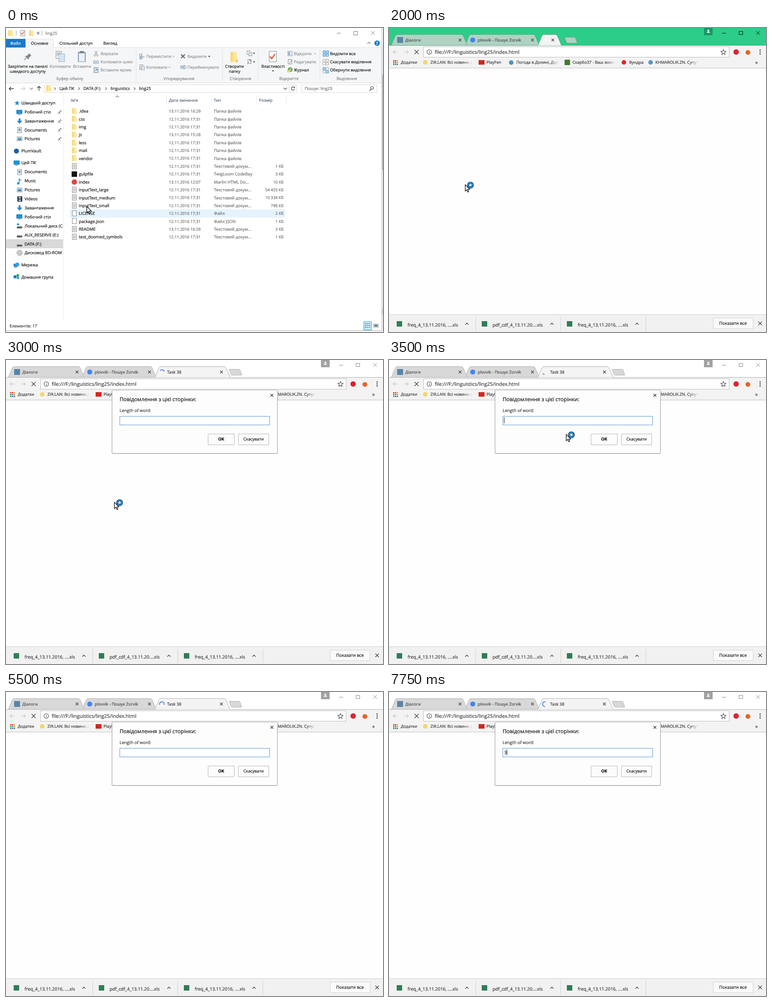
These frames come from a looping animation (833 by 672 pixels, 8 s). An HTML page:

```html
<!DOCTYPE html>
<html lang="uk">
<head>
<meta charset="utf-8">
<title>ling25</title>
<style>
html, body { margin: 0; width: 100%; height: 100%; overflow: hidden; background: #fff; }
svg { display: block; }
#stage { width: 100vw; height: 100vh; }
text { font-family: "Open Sans", "Noto Sans", sans-serif; text-rendering: geometricPrecision; white-space: pre; stroke-width: .2px; }
rect { shape-rendering: crispEdges; }
</style>
</head>
<body>
<svg id="stage" viewBox="0 0 833 672" preserveAspectRatio="none"></svg>
<script>
const INK = '#111', DIM = '#8a8a8a', GREY = '#6b6b6b', BLUE = '#1979ca';

// Drawing helpers; each returns SVG markup.
const R = (x, y, w, h, fill, line) => line
  ? `<rect x="${x + .5}" y="${y + .5}" width="${w - 1}" height="${h - 1}" fill="${fill}" stroke="${line}"/>`
  : `<rect x="${x}" y="${y}" width="${w}" height="${h}" fill="${fill}"/>`;
const P = (d, line, width = 1, fill = 'none') =>
  `<path d="${d}" stroke="${line}" stroke-width="${width}" fill="${fill}"/>`;
const C = (x, y, r, fill, line = 'none', width = 1) =>
  `<circle cx="${x}" cy="${y}" r="${r}" fill="${fill}" stroke="${line}" stroke-width="${width}"/>`;
// y is the middle of the capital letters
const T = (x, y, s, fill = INK, size = 9.25, anchor = 'start', weight = 400) =>
  `<text x="${x}" y="${y + size * .36}" fill="${fill}" stroke="${fill}" font-size="${size}" text-anchor="${anchor}" font-weight="${weight}">${s}</text>`;
const G = (id, body) => `<g id="${id}">${body}</g>`;
const clip = (x, y, w, h, body) =>
  `<svg x="${x}" y="${y}" width="${w}" height="${h}" viewBox="${x} ${y} ${w} ${h}">${body}</svg>`;

const vline = (x, y, h, c) => R(x, y, 1, h, c);
const hline = (x, y, w, c) => R(x, y, w, 1, c);
const cross = (x, y, r, c, w = 1) =>
  P(`M${x - r} ${y - r}L${x + r} ${y + r}M${x + r} ${y - r}L${x - r} ${y + r}`, c, w);
const drop = (x, y, c = '#333') => P(`M${x - 2.5} ${y - 1.2}h5l-2.5 2.7z`, 'none', 0, c);
const chev = (x, y, dx, dy, c = '#444', w = 1.2) => dx
  ? P(`M${x - 1.5 * dx} ${y - 3}l${3 * dx} 3l${-3 * dx} 3`, c, w)
  : P(`M${x - 3.5} ${y - 1.7 * dy}l3.5 ${3.4 * dy}l3.5 ${-3.4 * dy}`, c, w);
const arrow = (x, y, dx, c, w = 1.3) =>
  P(`M${x - 5} ${y}h10M${x + dx} ${y - 4}l${4 * dx} 4l${-4 * dx} 4`, c, w);
const folder = (x, y, w = 11, h = 13) =>
  R(x, y, w, h, '#fde596') + R(x, y, w * .3, h, '#f8d775') + R(x + w - 2, y, 2, h * .45, '#fff3c4');
const sheet = (x, y, lines = true, w = 10, h = 13) => R(x, y, w, h, '#fff', '#868686') +
  (lines ? [3, 5, 7, 9].map(k => hline(x + 2, y + k, w - 4, '#a0a0a0')).join('') : '');
const tick = (x, y, s) => P(`M${x - s} ${y}l${s * .7} ${s * .8}l${s * 1.2} ${-s * 1.7}`, '#d8542b', s * .42);
const disk = (x, y) => R(x - 6, y, 12, 4, '#5b5f62') + R(x - 5, y - 1, 10, 1, '#b6babd') + R(x + 3, y + 1, 2, 1, '#7ee06a');
const screen = (x, y) => R(x - 6, y - 5, 13, 9, '#1b95e0', '#1476b5') + R(x - 3, y + 5, 7, 1, '#5f6f7c');
const photo = (x, y) => R(x - 6, y - 5, 12, 10, '#fff', '#8795a0') + R(x - 4, y - 3, 8, 3, '#6fb4e2') + R(x - 4, y, 8, 3, '#47789a');
const down = (x, y) => P(`M${x - 2} ${y - 6}h4v5h4l-6 7l-6 -7h4z`, 'none', 0, '#2e86cf');
const doc = (x, y) => sheet(x - 5, y - 6) + R(x - 2, y - 3, 4, 5, '#5aa0d6');
const pin = (x, y) => P(`M${x - 4} ${y + 4}l3 -3M${x - 3} ${y - 1}l4 4M${x - 1} ${y}l3 -3M${x + 1} ${y - 4}l3 3`, '#868c92', 1.6);

function ribbon() {
  let s = R(0, 0, 833, 43, '#fff') + R(0, 43, 830, 78, '#f5f6f7') + hline(0, 43, 830, '#dcdddf') + hline(0, 121, 830, '#dadbdc');
  // title row
  s += folder(5, 5, 11, 13) + vline(22, 5, 12, '#999') + sheet(32, 5, false, 10, 13) + tick(37, 11, 3.6) +
    folder(51, 5, 10, 13) + hline(68, 9, 6, '#333') + drop(71, 13) + vline(79, 5, 12, '#aaa') + T(87, 11.5, 'ling25', '#777', 9.3);
  s += hline(731, 11, 9, '#777') + R(768, 7, 9, 9, 'none', '#777') + cross(810.5, 11, 4, '#777');
  // tabs
  s += R(0, 24, 43, 19, BLUE) + T(21, 34, 'Файл', '#fff', 9.1, 'middle') + R(43, 24, 62, 20, '#f5f6f7', '#dcdddf') + R(44, 43, 60, 1, '#f5f6f7') +
    T(55, 34, 'Основне', INK, 9.1) + T(118, 34, 'Спільний доступ', INK, 9.1) + T(215, 34, 'Вигляд', INK, 9.1) +
    chev(802, 33, 0, -1, '#777') + C(820, 33.5, 6, BLUE) + T(820, 33.5, '?', '#fff', 9, 'middle', 700);
  for (const x of [287, 478, 557, 693]) s += vline(x, 47, 70, '#e0e1e2');
  for (const [x, l] of [[141, 'Буфер обміну'], [382, 'Упорядкування'], [518, 'Створення'], [625, 'Відкриття'], [753, 'Виділення']])
    s += T(x, 112, l, '#7d7d7d', 9, 'middle');
  // large buttons
  for (const [x, y, l, c] of [[48, 85, 'Закріпити на панелі', INK], [48, 95.5, 'швидкого доступу', INK], [120, 85, 'Копіювати', DIM],
    [168, 85, 'Вставити', DIM], [505, 85, 'Створити', INK], [505, 95.5, 'папку', INK], [590, 85, 'Властивості', INK]])
    s += T(x, y, l, c, 9, 'middle');
  s += P('M40 71l6 -6', '#7e858c', 1.5) + P('M42 62l8 8l1 -5l5 -4l-5 -5l-4 5z', 'none', 0, '#7e858c') +
    sheet(110, 51, true, 13, 17) + R(116, 57, 14, 18, '#d5e3f0', '#9fb3c6') +
    R(159, 53, 17, 22, '#8ba3ba', '#7891a8') + R(161, 56, 13, 18, '#e9f0f6') + R(163, 51, 9, 4, '#74818d') +
    folder(496, 53, 15, 22) + P('M508 75l3 -5l1 5z', '#e2a53a', 1) + sheet(581, 51, false, 17, 24) + tick(589, 63, 6) + drop(590, 95);
  // small buttons
  for (const [x, y, l, c] of [[209, 57, 'Вирізати', DIM], [209, 75, 'Копіювати шлях', DIM], [209, 93, 'Вставити ярлик', DIM],
    [310, 63, 'Перемістити', DIM], [310, 87, 'Копіювати', DIM], [401, 63, 'Видалити', DIM], [401, 87, 'Перейменувати', DIM],
    [636, 57, 'Відкрити', DIM], [636, 75, 'Редагувати', DIM], [636, 93, 'Журнал', INK],
    [716, 57, 'Виділити все', INK], [716, 75, 'Скасувати виділення', INK], [716, 93, 'Обернути виділення', INK]])
    s += T(x, y, l, c, 9);
  s += P('M196 51l5 8M202 51l-5 8', '#8797a5', 1.2) + C(196, 60.5, 1.8, 'none', '#8797a5') + C(202, 60.5, 1.8, 'none', '#8797a5') +
    R(193, 72, 12, 7, '#dfe8f0', '#93a7ba') + hline(195, 75, 7, '#6d8aa5') + R(194, 87, 10, 12, '#dbe6f0', '#62809c') + P('M197 95l4 -4m-3 0h3v3', '#4e7398');
  s += sheet(295, 57, false, 6, 12) + arrow(301, 64, -1, '#a1b4c6', 2) + sheet(295, 81, true, 8, 11) + R(299, 84, 8, 9, '#d9e5f0', '#9fb3c6') +
    cross(391, 62.5, 4.2, '#5f6f80', 2.4) + R(385, 83, 13, 7, '#e6edf4', '#97a9ba') + R(387, 85, 5, 3, '#93b0cb') + vline(393, 81, 11, '#788898') +
    drop(370, 63, '#aaa') + drop(361, 87, '#aaa') + drop(449, 63);
  s += sheet(532, 50, false, 7, 9) + R(536, 54, 8, 8, '#e8f1f9', '#7e99b2') + drop(548, 56) + sheet(534, 69, false, 8, 10) + P('M533 79l8 -8m-4 0h4v4', '#4e7398') + drop(548, 75);
  s += R(622, 51, 11, 11, '#dfe8f0', '#8fa5ba') + R(624, 53, 3, 7, '#8fa5ba') + drop(683, 57, '#aaa') + sheet(623, 69, false, 9, 11) + P('M626 78l6 -7', '#8fa5ba', 1.6) +
    C(628, 92, 5.3, '#62a84f') + P('M628 89v4h3', '#fff', 1.2) + R(621, 93, 7, 5, '#f4d268');
  for (const [y, on] of [[50, [1, 1, 1, 1]], [69, [0, 0, 0, 0]], [87, [1, 0, 0, 1]]])
    on.forEach((v, i) => s += R(700 + i % 2 * 7, y + (i >> 1) * 7, 6, 6, v ? '#bfe0f6' : '#fff', v ? '#2b88cc' : '#a3a3a3'));
  return s;
}

function addressBar() {
  let s = arrow(12, 134, -1, '#333') + arrow(37, 134, 1, '#cfcfcf') + chev(56, 134, 0, 1, '#777') +
    P('M73 139v-10M69 133l4 -4l4 4', '#333', 1.3) + R(84, 125, 559, 18, '#fff', '#d9d9d9') + folder(89, 127, 11, 13) +
    vline(625, 125, 18, '#d9d9d9') + chev(617, 134, 0, 1) + P('M637.2 132a3.6 3.6 0 1 0 .4 2.6', '#444', 1.3) + drop(637, 131.5, '#444');
  for (const x of [108, 161, 221, 284]) s += chev(x, 134, .8, 0);
  for (const [x, l] of [[118, 'Цей ПК'], [171, 'DATA (F:)'], [231, 'linguistics'], [294, 'ling25']]) s += T(x, 133.5, l, INK, 9.35);
  return s + R(652, 125, 168, 18, '#fff', '#d9d9d9') + T(660, 134, 'Пошук: ling25', '#6c6c6c', 9.3) +
    C(809, 132.5, 3, 'none', '#444', 1.2) + P('M807 135l-4 4', '#444', 1.5);
}

function sidebar() {
  const items = [
    [166, 34, 'Швидкий доступ', P('M24.5 160l1.7 4h4.3l-3.4 2.8l1.3 4.5l-3.9 -2.7l-3.9 2.7l1.3 -4.5l-3.4 -2.8h4.3z', 'none', 0, '#2b8fd8')],
    [186, 41, 'Робочий стіл', screen(29, 186)], [205.5, 41, 'Завантаження', down(30, 206)],
    [225.5, 41, 'Documents', doc(30, 225)], [245, 41, 'Pictures', photo(30, 245)],
    [272, 34, 'PlumVault', C(23, 272, 5.5, '#1560a8')], [298, 34, 'Цей ПК', screen(23, 298)],
    [318, 41, 'Documents', doc(30, 318)],
    [338, 41, 'Music', P('M29 344v-11q1 3 5 4', '#2b8fd8', 1.7) + C(27, 343.5, 2.6, '#2b8fd8')],
    [358, 41, 'Pictures', photo(30, 358)],
    [378, 41, 'Videos', R(25, 372, 11, 12, '#333b46') + R(28, 373, 5, 4, '#8ab0d2') + R(28, 379, 5, 4, '#8ab0d2')],
    [398, 41, 'Завантаження', down(30, 398)], [417.5, 41, 'Робочий стіл', screen(29, 417)],
    [437.5, 41, 'Локальний диск (C:)', disk(30, 439) + R(24, 432, 5, 4, '#2b9be6')],
    [457.5, 41, 'AUX_RESERVE (E:)', disk(30, 459)], [477.5, 41, 'DATA (F:)', disk(30, 479)],
    [497, 41, 'Дисковод BD-ROM', C(30, 497, 6, '#cfd2d4', '#8e9296') + C(30, 497, 1.8, '#fff', '#999')],
    [524, 34, 'Мережа', R(17, 521, 8, 7, '#2c8fd4', '#1c6da8') + C(25, 523, 4.5, '#3d9fe0') + R(19, 529, 5, 1, '#555')],
    [550.5, 34, 'Домашня група', C(20, 550, 3.5, '#1b7ac4') + C(26, 547, 3, '#36a85b') + C(26.5, 552.5, 2.7, '#2b9be6')]
  ];
  let s = R(0, 467, 127, 20, '#d9d9d9');
  for (const [y, x, l, icon] of items) s += T(x, y, l) + icon;
  for (const y of [186, 206, 225, 245]) s += pin(119, y);
  return clip(0, 146, 126, 500, s) + vline(127, 146, 500, '#ececec');
}

const rowY = i => 184 + i * 17.38;

function files() {
  const txt = 'Текстовий докум...', dir = 'Папка файлів', usual = '12.11.2016 17:31', late = '13.11.2016 16:29';
  const rows = [['.idea', dir, '', late], ['css', dir], ['img', dir], ['js', dir, '', '13.11.2016 15:28'], ['less', dir], ['mail', dir], ['vendor', dir],
    ['', txt, '1 КБ'], ['gulpfile', 'TwigLoom CodeBay', '3 КБ'], ['index', 'Marlin HTML Do...', '10 КБ', '13.11.2016 12:07'],
    ['inputText_large', txt, '54 455 КБ'], ['inputText_medium', txt, '10 334 КБ'], ['inputText_small', txt, '798 КБ'],
    ['LICENSE', 'Файл', '2 КБ'], ['package.json', 'Файл JSON', '1 КБ'], ['README', txt, '3 КБ', late], ['test_doomed_symbols', txt, '1 КБ']];
  let s = chev(246, 151.5, 0, -1, '#777');
  for (const x of [354, 453, 553, 619]) s += vline(x, 149, 22, '#e5e5e5');
  for (const [x, l] of [[143, "Ім'я"], [360, 'Дата змінення'], [459, 'Тип'], [559, 'Розмір']]) s += T(x, 160, l, '#4c5c74', 9.1);
  rows.forEach(([name, type, size = '', date = usual], i) => {
    const y = rowY(i), top = Math.round(y - 7);
    s += type === dir ? folder(146, top, 10, 13)
      : i === 8 ? R(145, top + 1, 12, 12, '#111')
      : i === 9 ? C(151, y, 6, '#dc4a3d')
      : sheet(146, top, type === txt);
    s += T(161, y, name) + T(360, y, date, GREY, 8.85) + T(459.5, y, type, GREY) + T(613.5, y, size, GREY, 8.9, 'end');
  });
  return s;
}

function explorer() {
  return R(0, 0, 833, 672, '#fff') + `<rect id="hover" x="141" width="476" height="18" fill="#e5f3fc"/>` +
    ribbon() + addressBar() + sidebar() + files() +
    T(8, 659, 'Елементів: 17', '#333') + R(790, 649, 18, 19, '#cdeafa', '#2c9fdc') +
    [653, 657, 661].map(y => R(793, y, 2, 2, '#44789c') + hline(796, y, 4, '#555') + hline(801, y, 4, '#555')).join('') +
    R(812, 654, 11, 8, '#fff', '#888') + R(814, 656, 7, 4, '#44789c') +
    vline(830, 0, 669, '#bdbdbd') + R(831, 38, 2, 634, '#f0f0f0') + R(831, 103, 2, 211, '#bcbcbc') +
    R(831, 620, 2, 14, '#d2d2d2') + hline(0, 668, 831, '#b8b8b8') + R(0, 669, 833, 3, '#f3f3f3');
}

// Tab strip: end is the right foot of the front tab, plus the left of the new-tab button
function strip(id, { bar, back, edge, ink, badge }, end, plus) {
  const tab = (a, b, fill) => P(`M${a} 38.5L${a + 9} 17.5Q${a + 10.5} 14.5 ${a + 13} 14.5H${b - 13}Q${b - 10.5} 14.5 ${b - 9} 17.5L${b} 38.5`, edge, 1, fill);
  const x = end - 18;
  return G(id, R(0, 0, 833, 39, bar) + tab(168, 332, back) + tab(5, 173, back) + hline(0, 38, 833, edge) + tab(329, end + 1, '#f4f4f4') +
    P(`M${plus} 20.5H${plus + 21}Q${plus + 23} 20.5 ${plus + 24} 22L${plus + 28} 33.5H${plus + 7}Q${plus + 5} 33.5 ${plus + 4} 31z`, edge, 1, back) +
    R(18, 20, 13, 13, '#5785ab') + T(36, 26.5, 'Діалоги', '#454545', 9.1) + cross(157, 26.5, 3, '#444', 1.3) +
    C(185, 26.5, 5.5, '#4285f4') + T(196, 26.5, 'plovvik - Пошук Zorvik', '#454545', 9.2) + cross(317, 26.5, 3, '#444', 1.3) +
    cross(x, 26.5, 3, '#444', 1.3) + (end > 400 ? T(356, 26.5, 'Task 38', '#333', 9.2) : '') +
    R(696, 0, 19, 16, badge) + C(705.5, 5.5, 1.9, '#fff') + P('M702 10.5q0 -2.7 3.5 -2.7t3.5 2.7z', 'none', 0, '#fff') +
    hline(736, 11, 9, ink) + R(773, 7, 9, 8, 'none', ink) + cross(815.5, 11, 4, ink));
}

function toolbar() {
  let s = R(0, 39, 833, 49, '#f3f3f3') + hline(0, 88, 833, '#bdbdbd') +
    arrow(14, 53, -1, '#cdcdcd') + arrow(38, 53, 1, '#cdcdcd') + cross(61, 53, 4.5, '#444', 1.4) +
    R(76, 41, 676, 24, '#fff', '#bcbcbc') + C(89, 53, 5, 'none', '#444', 1.1) + R(88.5, 52, 1, 4, '#444') + R(88.5, 50, 1, 1, '#444') +
    T(101, 53, 'file:///F:/linguistics/ling25/index.html', '#333', 11) +
    P('M739 47.5l1.6 3.8l4.2 .4l-3.2 2.7l1 4l-3.6 -2.2l-3.6 2.2l1 -4l-3.2 -2.7l4.2 -.4z', '#444', 1.1) +
    C(767, 53, 6, '#dc2430') + C(793, 54, 5.3, '#e2672a');
  for (const y of [48.5, 53, 57.5]) s += C(820, y, 1.4, '#444');
  const dots = ['#e2483d', '#e2483d', '#e8a52f', '#4aa35a', '#4285f4', '#e8a52f', '#4aa35a', '#4285f4', '#777'];
  dots.forEach((c, i) => s += R(9 + i % 3 * 4, 71 + Math.floor(i / 3) * 4, 3, 3, c));
  s += T(26, 76, 'Додатки', '#333', 9);
  const marks = [[80, 184, 'ZIR.LAN: Всі новини дня', C(80, 76, 5, '#f3d768')], [204, 0, 'PlayFen', R(198, 71, 13, 10, '#d8251f')],
    [270, 376, 'Погода в Долині, Долина', C(270, 76.5, 5, '#4d92c4')], [394, 500, 'Скарбо37 - Ваш живий', R(388, 70, 12, 12, '#3f7d2c')],
    [519, 0, 'Вундра', C(519, 76, 5, '#e0261f')], [577, 684, 'KHMAROLIK.ZN. Супутник', C(578, 76, 5, '#4f9ad0')]];
  for (const [x, end, l, icon] of marks) {
    const label = T(x + 11.5, 76, l, '#333', 9);
    s += icon + (end ? clip(x + 11, 69, end - x - 11, 15, label) + R(end - 20, 69, 20, 15, 'url(#fade)') : label);
  }
  return s + T(812, 75.5, '»', '#444', 12, 'middle');
}

function shelf() {
  let s = R(0, 633, 833, 39, '#f1f1f1') + hline(0, 633, 833, '#cfcfcf');
  ['freq_4_13.11.2016, ....xls', 'pdf_cdf_4_13.11.20....xls', 'freq_4_13.11.2016, ....xls'].forEach((l, i) => {
    const x = i * 188;
    s += R(x + 17, 648, 12, 12, '#2f7d55') + T(x + 41, 656, l, '#333', 9.9) + chev(x + 172, 654, 0, -1, '#444', 1.4) + vline(x + 191, 639, 31, '#d0d0d0');
  });
  return s + R(716, 641, 89, 24, '#fafafa', '#d3d3d3') + T(760, 653, 'Показати все', INK, 9.5, 'middle') + cross(820, 653, 3.8, '#444', 1.4);
}

function dialog() {
  const button = (x, w, l, weight) => `<rect x="${x}.5" y="163.5" width="${w}" height="24" rx="1.5" fill="#fcfcfc" stroke="#b5b5b5"/>` +
    T(x + w / 2 + .5, 175, l, INK, 9.2, 'middle', weight);
  return G('dialog', `<rect x="233" y="66" width="368" height="142" rx="3" fill="#000" opacity=".12"/>` +
    `<rect x="234.5" y="66.5" width="365" height="140" rx="2" fill="#fdfdfd" stroke="#b2b2b2"/>` + hline(236, 206, 363, '#999') +
    T(251, 87, 'Повідомлення з цієї сторінки:', INK, 11.8) + cross(587.5, 78, 3, '#444', 1.5) + T(251, 112, 'Length of word:', '#333', 9.5) +
    R(251, 124, 332, 20, '#fff', '#5d97d3') + button(446, 58, 'OK', 700) + button(513, 67, 'Скасувати', 400) +
    G('digit', T(254.5, 134, '3', INK, 9.5)) + `<rect id="caret" y="127" width="1" height="13" fill="#111"/>`);
}

const active = { bar: '#2bcd89', back: '#aed3c2', edge: '#6ba489', ink: '#111', badge: '#1c9666' };
const inactive = { bar: '#fff', back: '#d8d8d8', edge: '#b0b0b0', ink: '#888', badge: '#a2a2a2' };

function browser() {
  return R(0, 0, 833, 672, '#fefefe') + strip('opening', active, 380, 388) +
    strip('loading', active, 494, 493) + strip('idle', inactive, 494, 493) +
    `<path id="spin" fill="none" stroke="#4a86e8" stroke-width="1.9"/>` + toolbar() + shelf() + dialog();
}

const stage = document.getElementById('stage');
stage.innerHTML = '<defs><linearGradient id="fade"><stop offset="0" stop-color="#f3f3f3" stop-opacity="0"/><stop offset="1" stop-color="#f3f3f3"/></linearGradient></defs>' +
  G('files', explorer()) + G('web', browser()) +
  G('cursor', P('M0 0V14L3.3 11L5.5 16.3L7.8 15.3L5.6 10.2H10Z', '#000', 1.2, '#fff') +
    G('busy', C(11.5, .8, 7.4, '#0b3558') + C(11.5, .8, 6.2, '#2795e6') + C(11.5, .8, 3.7, '#0b3558') + C(11.5, .8, 2.7, '#fff')));

const el = id => document.getElementById(id);
const show = (id, on) => el(id).style.display = on ? '' : 'none';

const LOOP = 8000, STEP = 250, OPEN = 2000, ASK = 2500, TYPED = 7250, BLINK = 530;
// time, x, y of the pointer tip
const moves = [[0, 178.5, 394.5], [250, 172.5, 364.5], [500, 168.5, 339.5], [2000, 168.5, 346.5], [3000, 239.5, 314.5], [3250, 332.5, 223.5], [3500, 391.5, 164.5]];
const GONE = 4000;
// time, hovered row
const hovers = [[0, 13], [250, 11], [500, 9]];
const at = (table, t) => table.filter(k => k[0] <= t).pop();

// Arc grows, then its tail catches up, while the whole turns.
function spinner(t) {
  const half = 666.5, sweep = 270, e = t - ASK + 520 + half * 2;
  const cycle = Math.floor(e / (half * 2)) - 1, part = e / half % 2, p = part % 1, ease = p * p * (3 - 2 * p);
  const tail = part < 1 ? 0 : sweep * ease;
  const len = Math.max(8, part < 1 ? sweep * ease : sweep - tail);
  const a = -40 + (t - ASK) * 360 / 1568 + cycle * sweep + tail;
  const pt = d => `${344.5 + 5.3 * Math.cos(d * Math.PI / 180)} ${26.8 + 5.3 * Math.sin(d * Math.PI / 180)}`;
  return `M${pt(a)}A5.3 5.3 0 ${len > 180 ? 1 : 0} 1 ${pt(a + len)}`;
}

function draw(now) {
  const t = Math.floor(now % LOOP / STEP) * STEP, web = t >= OPEN, typed = t >= TYPED;
  show('files', !web);
  show('web', web);
  show('opening', t < OPEN + STEP);
  show('loading', t >= OPEN + STEP && t < ASK);
  show('idle', t >= ASK);
  show('spin', t > OPEN);
  show('dialog', t >= ASK);
  show('digit', typed);
  show('caret', (t - (typed ? TYPED : ASK - 100)) % (2 * BLINK) < BLINK);
  show('busy', web);
  show('cursor', t < GONE);
  const [, x, y] = at(moves, t);
  el('cursor').setAttribute('transform', `translate(${x} ${y})`);
  el('hover').setAttribute('y', Math.round(rowY(at(hovers, t)[1]) - 9));
  el('caret').setAttribute('x', typed ? 260 : 254);
  el('spin').setAttribute('d', spinner(t));
}

const start = performance.now();
function tickFrame() {
  draw(performance.now() - start);
  requestAnimationFrame(tickFrame);
}
tickFrame();
</script>
</body>
</html>
```
